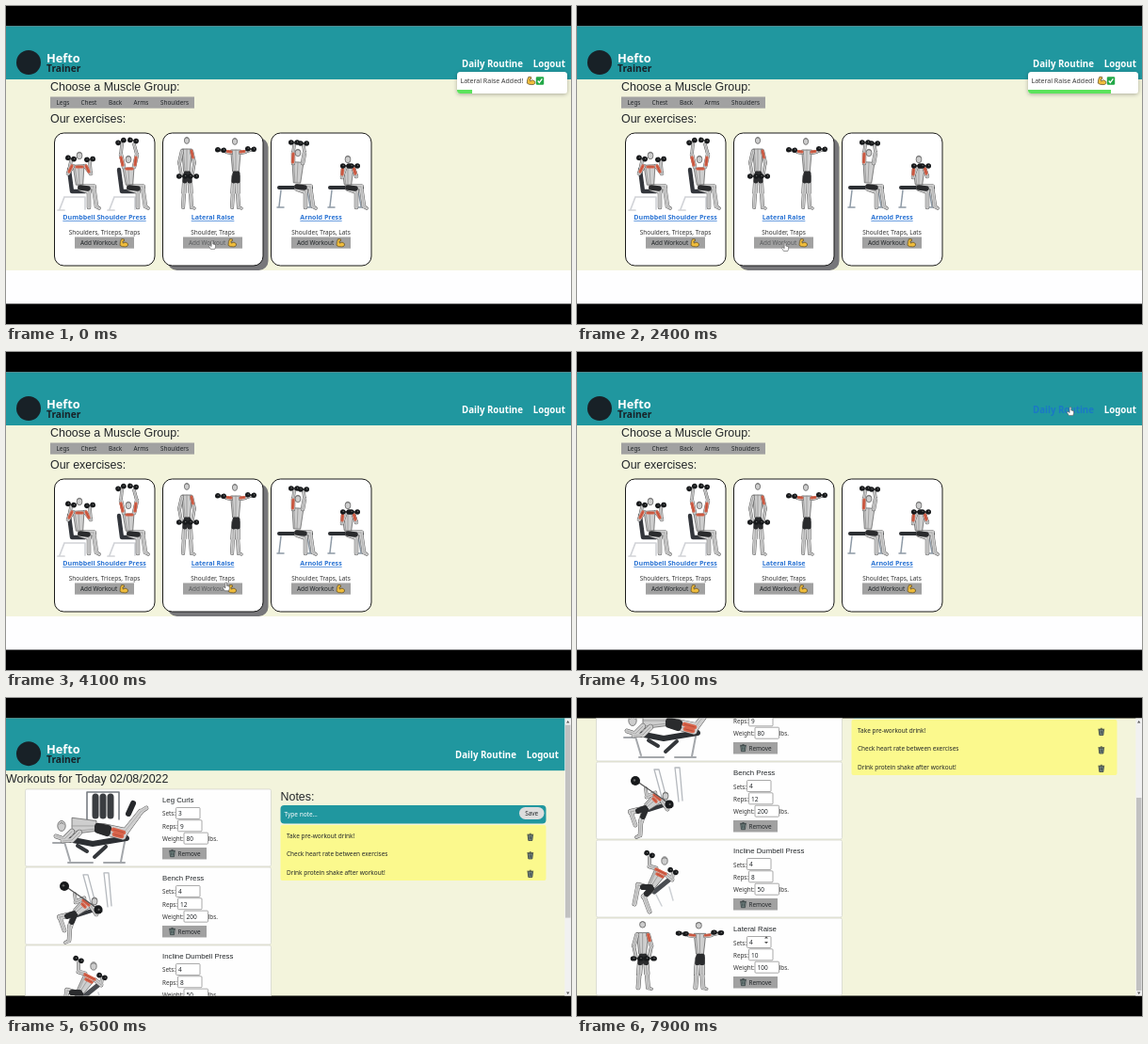
These frames come from a looping animation (600x338 px, 8 s). An HTML page:

```html
<!DOCTYPE html>
<html lang="en">
<head>
<meta charset="utf-8">
<title>Workout planner</title>
<style>
html, body { margin: 0; width: 100%; height: 100%; overflow: hidden; background: #000; }
svg { display: block; width: 600px; height: 338px; font-family: "Noto Sans", "Open Sans", sans-serif; }
.head { font-family: "Liberation Sans", Arial, sans-serif; }
.bold { font-weight: 700; }
.fig path { fill: none; stroke-linecap: round; stroke-linejoin: round; }
</style>
</head>
<body>
<svg id="stage" viewBox="0 0 600 338"></svg>
<script>
const LOOP = 8000, PAGE_SWITCH = 5300, MAX_SCROLL = 112.8;
const TEAL = '#20979f', BEIGE = '#f3f4dc', INK = '#222629', GREY = '#a1a1a1';

const text = (x, y, s, size = 6.5, fill = INK, attrs = '') =>
  `<text x="${x}" y="${y}" font-size="${size}" fill="${fill}" ${attrs}>${s}</text>`;
const heading = (x, y, s, size = 12.45) => text(x, y, s, size, INK, 'class="head"');
const middle = 'text-anchor="middle"';
const rect = (x, y, w, h, fill, attrs = '') =>
  `<rect x="${x}" y="${y}" width="${w}" height="${h}" fill="${fill}" ${attrs}/>`;
const line = (d, w, color) => `<path d="${d}" stroke="${color}" stroke-width="${w}"/>`;
const group = (content, x, y, attrs = '') => `<g transform="translate(${x} ${y})" ${attrs}>${content}</g>`;

// Icons, centred on x, y
const flex = (x, y) => group(`<path d="M-2.6-4.2L.2-4 .3-2-1.3-1.8-.9.3Q2-2 4.2.8 4.9 3.9 1.5 4.1-2.5 4.3-4.2 2.6-4.3-1.5-2.6-4.2Z"
  fill="#f0bd3c" stroke="#5b4a25" stroke-width=".7"/>`, x, y);
const check = (x, y) => group(rect(-4.2, -4.2, 8.4, 8.4, '#22a846', 'rx="1.2"') +
  '<path d="M-2.3 0L-.7 2 2.4-2.2" fill="none" stroke="#fff" stroke-width="1.3"/>', x, y);
const trash = (x, y) => group(`<path d="M-2.7-2.2H2.7L2 3.5H-2Z" fill="#7d8f8c" stroke="#333e3f" stroke-width=".8"/>
  <path d="M-3.4-2.8H3.4M-1-3.7H1M-.8-1V2.3M.8-1V2.3" stroke="#333e3f" stroke-width=".8"/>`, x, y);

// Exercise drawings
const dumbbell = (x, y, angle = 0, r = 2.8) => `<g transform="translate(${x} ${y}) rotate(${angle})">
  <path d="M-5 0H5" stroke="#333" stroke-width="1.4"/>
  <circle cx="-3.2" r="${r}" fill="#17191b"/><circle cx="3.2" r="${r}" fill="#17191b"/>
  <circle cx="-2.8" cy="-.5" r=".7" fill="#666"/><circle cx="3.6" cy="-.5" r=".7" fill="#666"/></g>`;

// Each joint makes the limb thinner
function limb([x, y, ...joints], width, extra, color) {
  let out = '';
  for (let i = 0; i < joints.length; i += 2) {
    const [nx, ny] = joints.slice(i, i + 2);
    out += line(`M${x} ${y}L${nx} ${ny}`, width + extra, color);
    [x, y, width] = [nx, ny, width * .74];
  }
  return out;
}

function trunk([x0, y0, x1, y1], half) {
  const length = Math.hypot(x1 - x0, y1 - y0);
  const nx = (y0 - y1) / length * half, ny = (x1 - x0) / length * half;
  const points = [[x0 + nx, y0 + ny], [x0 - nx, y0 - ny], [x1 - nx * .62, y1 - ny * .62], [x1 + nx * .62, y1 + ny * .62]];
  return `<polygon points="${points.join(' ')}" fill="#cecece" stroke="#555" stroke-width=".7" stroke-linejoin="round"/>` +
    line(`M${x0} ${y0}L${x1} ${y1}M${x0 + nx * .7} ${y0 + ny * .7}L${x1 + nx * .35} ${y1 + ny * .35}`, .7, '#8e8e8e');
}

function man({ head: [x, y], torso, arms, legs, shorts, red, size = 1 }) {
  const limbs = (all, w) => all.map(l => limb(l, w, .9, '#555')).join('') +
    all.map(l => limb(l, w, 0, '#d0d0d0') + limb(l, .7, 0, '#949494')).join('');
  return limbs(legs, 4.8 * size) + trunk(torso, 6 * size) + limbs(arms, 3.5 * size) +
    line(shorts, 5.6 * size, '#2a2b2d') + line(red, 3.2 * size, '#d9654c') + line(red, .6, '#a63d2b') +
    `<ellipse cx="${x}" cy="${y}" rx="${2.9 * size}" ry="${3.8 * size}" fill="#cdcdcd" stroke="#555" stroke-width=".7"/>` +
    line(`M${x - 2.2} ${y - 2}q2.2-2.8 4.4 0`, 1, '#777');
}

const chair = x => line(`M${x} 203L${x - 5} 216M${x + 22} 203V216M${x - 7} 217H${x}M${x} 203H${x + 22}`, 1.7, '#d2d4d8') +
  line(`M${x + 5} 174L${x + 8} 197H${x + 22}`, 4.4, '#33363c');
const flatBench = x => line(`M${x + 5} 196L${x + 3} 213M${x + 33} 196L${x + 36} 213M${x + 1} 214H${x + 8}M${x + 32} 214H${x + 38}`, 1.5, '#8d99a5') +
  line(`M${x + 3} 193H${x + 37}`, 4, '#2c2f33');
const seatedLegs = (x, y = 192) => [[x, y + 2, x + 9, y + 5, x + 9, 214], [x, y, x + 14, y, x + 17, 213, x + 20, 215]];

const shoulderPress = chair(62) + man({
    head: [78, 159], torso: [77, 169, 78, 190], legs: seatedLegs(79),
    arms: [[71, 170, 66, 178, 69, 165], [84, 170, 90, 178, 89, 166]],
    shorts: 'M79 193L87 194', red: 'M70 170L67 176M85 170L88 176M75 171H81' }) +
  dumbbell(69, 162, 12) + dumbbell(89, 163, -8) +
  chair(115) + man({
    head: [130, 163], torso: [130, 172, 131, 190], legs: seatedLegs(131),
    arms: [[125, 171, 122, 158, 123, 147], [136, 171, 139, 158, 136, 147]],
    shorts: 'M131 193L140 194', red: 'M124 169L122 161M137 169L138 161M128 173H134' }) +
  dumbbell(122, 144, -25) + dumbbell(135, 143, 10);

const lateralRaise = man({
    head: [192, 143], torso: [192, 152, 192, 176], legs: [[190, 181, 189, 198, 188, 214], [195, 181, 196, 198, 197, 214, 200, 215]],
    arms: [[187, 154, 184, 167, 186, 179], [197, 154, 200, 167, 198, 179]],
    shorts: 'M191 178L190 186M194 178L195 186', red: 'M197 154L198.5 161', size: .9 }) +
  dumbbell(187, 181) + dumbbell(199, 181) + man({
    head: [243, 144], torso: [244, 153, 244, 176], legs: [[242, 181, 241, 198, 240, 214], [246, 181, 246, 198, 247, 214, 250, 215]],
    arms: [[239, 156, 234, 155, 227, 153], [249, 156, 254, 155, 261, 153]],
    shorts: 'M243 178L242 186M246 178L246 186', red: 'M239 155L235 154.5M249 155L253 154.5', size: .9 }) +
  dumbbell(228, 153, 5) + dumbbell(260, 152, 5);

const arnoldPress = flatBench(287) + man({
    head: [310, 156], torso: [310, 166, 309, 188], legs: seatedLegs(309),
    arms: [[305, 167, 305, 156, 306, 148], [315, 167, 317, 156, 316, 148]],
    shorts: 'M309 192L317 193', red: 'M304.5 166L305 157' }) +
  dumbbell(306, 145) + dumbbell(316, 146) + flatBench(341) + man({
    head: [363, 163], torso: [363, 172, 363, 190], legs: seatedLegs(363),
    arms: [[358, 173, 357, 182, 361, 171], [369, 173, 372, 181, 369, 171]],
    shorts: 'M363 193L371 194', red: 'M357.5 173L357 179M369.5 173L371 178' }) +
  dumbbell(361, 170) + dumbbell(370, 170);

const legCurl = line('M86 3V32M120 3V32M86 3H120', 1.6, '#777c82') +
  line('M95 8V28M103 8V28M111 8V28', 7, '#3a3d41') +
  line('M62 56L68 76M126 56L122 77M66 78H92M104 78H126M50 57H62', 2, '#a4a7ab') + line('M66 53L92 58L128 52', 6, '#2c2f33') +
  line('M106 61L94 72M76 60L86 66', 4, '#34373b') + man({
    head: [59, 39], torso: [70, 39, 96, 39], size: 1.45,
    arms: [[70, 45, 62, 53, 53, 50], [78, 46, 70, 54, 60, 55]],
    legs: [[102, 44, 124, 50, 140, 28], [102, 40, 126, 45, 143, 24, 149, 20]],
    shorts: 'M98 40L108 42M98 43L107 46', red: 'M114 43L125 46M115 48L123 50' }) +
  line('M130 26L135 15', 6, '#26282b');

const benchPress = line('M82 8L91 41M87 8L96 42M104 6L108 42M109 6L112 41M82 8H87M104 6H109', 1.3, '#b4b8bd') +
  line('M76 51L98 44', 4, '#34373b') + man({
    head: [94, 36], torso: [87, 37, 74, 48], size: 1.05,
    arms: [[83, 33, 74, 37, 73, 28], [90, 41, 96, 50, 94, 43]],
    legs: [[72, 50, 68, 63, 67, 78, 63, 80], [70, 50, 57, 53, 62, 67]],
    shorts: 'M72 49L65 52M73 51L70 58', red: 'M82 35L88 40M81 39L84 42' }) +
  line('M60 18L102 47', 1.3, '#555') + '<circle cx="62" cy="20" r="5" fill="#17191b"/><circle cx="98" cy="45" r="4.6" fill="#17191b"/>' +
  '<circle cx="61" cy="19.4" r="1.2" fill="#666"/><circle cx="98.6" cy="45" r="1.1" fill="#666"/>';

const inclinePress = line('M84 58L90 70M98 50L102 64', 1.5, '#ced1d5') + line('M82 55L98 42', 5, '#4a4d52') + man({
    head: [93, 22], torso: [89, 33, 79, 49], size: 1.1,
    arms: [[84, 30, 77, 28, 77, 18], [95, 37, 101, 42, 102, 34]],
    legs: [[79, 53, 71, 60, 77, 76], [76, 51, 65, 48, 61, 68]],
    shorts: 'M78 50L70 50M79 52L74 57', red: 'M84 31L94 36M85 36L91 39' }) +
  dumbbell(77, 15, 25) + dumbbell(102, 33, 25);

// Shared page parts
const header = navX => rect(0, 21, 600, 57, TEAL) +
  '<circle cx="24" cy="60" r="13" fill="#182127"/>' +
  text(43, 59.8, 'Hefto', 12.8, '#fff', 'class="bold"') + text(43, 70.3, 'Trainer', 10.2, '#182127', 'class="bold"') +
  text(navX, 65, 'Daily Routine', 9.7, '#fff', `class="bold" id="nav${navX}"`) +
  text(navX + 75.7, 65, 'Logout', 9.7, '#fff', 'class="bold"');

function exerciseCard(x, name, muscles, drawing, id) {
  const mid = x + 53.5;
  return rect(x + 5.5, 140, 107, 141, '#77777a', `rx="10" id="shadow${id}"`) +
    rect(x + .5, 135, 106.5, 141, '#fff', 'rx="10" stroke="#1a1a1a"') +
    `<g class="fig">${drawing}</g>` +
    text(mid, 227, name, 7.08, '#2b74d4', `class="bold" text-decoration="underline" ${middle}`) +
    text(mid, 243, muscles, 6.5, '#333', middle) +
    rect(mid - 31.5, 245.5, 63, 12.2, GREY) +
    text(mid - 25.5, 254.2, 'Add Workout', 6.35, INK, `id="add${id}"`) + flex(mid + 20.7, 251.8);
}

const groups = [['Legs', 53.5], ['Chest', 79.5], ['Back', 109], ['Arms', 135.5], ['Shoulders', 164]];
const exercisesPage = rect(0, 21, 600, 296, '#fefeff') + rect(0, 78, 600, 203, BEIGE) + header(484) +
  heading(47, 90.4, 'Choose a Muscle Group:') + rect(47, 96.5, 153, 12.2, GREY) +
  groups.map(([name, x]) => text(x, 104.8, name, 6.36)).join('') +
  heading(47, 124, 'Our exercises:') +
  exerciseCard(51, 'Dumbbell Shoulder Press', 'Shoulders, Triceps, Traps', shoulderPress, 0) +
  exerciseCard(166, 'Lateral Raise', 'Shoulder, Traps', lateralRaise, 1) +
  exerciseCard(281, 'Arnold Press', 'Shoulder, Traps, Lats', arnoldPress, 2);

const toast = `<g id="toast" filter="url(#soft)"><g clip-path="url(#toastClip)">` +
  rect(479, 70, 117, 23, '#fff') + text(482.5, 82, 'Lateral Raise Added!', 7, '#3a3a3a') +
  flex(557.5, 79.5) + check(567, 79.5) + rect(479, 89, 16, 4, '#5ce35c', 'id="bar"') + '</g></g>';

function field(label, value, y, x, w) {
  return text(166, y + 9, label, 6.3, '#333') +
    rect(x, y, w, 12, '#fff', 'rx="1" stroke="#858585" stroke-width=".7"') + text(x + 2.5, y + 8.8, value);
}

const workouts = [
  ['Leg Curls', 3, 9, 80, legCurl],
  ['Bench Press', 4, 12, 200, benchPress],
  ['Incline Dumbell Press', 4, 8, 50, inclinePress],
  ['Lateral Raise', 4, 10, 100, `<g transform="translate(-155 -129) scale(1.17 .95)">${lateralRaise}</g>`]
];
const workoutCard = ([name, sets, reps, weight, drawing], i) => group(
  rect(20.5, 0, 261, 82, '#fefefe', 'rx="1.5" stroke="#d5d6cc" stroke-width=".8"') +
  `<g class="fig">${drawing}</g>` + heading(166, 14, name, 7.8) +
  field('Sets:', sets, 19.5, 180.5, 25.5) + field('Reps:', reps, 32.8, 182.5, 25.5) +
  field('Weight:', weight, 46.2, 189, 25.5) + text(214.7, 55.2, 'lbs.', 6.3, '#333') +
  rect(166, 62, 47, 12.5, GREY) + trash(176.5, 68.2) + text(182.5, 70.7, 'Remove', 6.4), 0, 97 + 83 * i);

const notes = ['Take pre-workout drink!', 'Check heart rate between exercises', 'Drink protein shake after workout!'];
const routineBody = heading(0, 90, 'Workouts for Today 02/08/2022') + workouts.map(workoutCard).join('') +
  heading(291.5, 109, 'Notes:') + rect(291.5, 114, 282, 19.5, TEAL, 'rx="4"') +
  text(295.5, 126, 'Type note...', 6.5, '#fff') + rect(545, 116, 26.5, 13, '#dcdddd', 'rx="6.5"') +
  text(558.2, 124.7, 'Save', 6.4, INK, middle) + rect(291.5, 135, 282, 59, '#fbf98d', 'rx="2"') +
  notes.map((note, i) => text(298, 148.6 + 19.5 * i, note, 6.47) + trash(556.8, 148 + 19.5 * i)).join('') +
  '<path id="spinner" d="M199 367.6L201 365.3L203 367.6ZM199 371L201 373.3L203 371Z" fill="#555"/>';
const routinePage = rect(0, 21, 600, 409, BEIGE) + header(477) + group(routineBody, 0, .8);

const scrollbar = rect(593.3, 21, 6.7, 296, '#f1f1f1') + rect(594, 28, 5.4, 205, '#c1c1c1', 'id="thumb"') +
  '<path d="M595 26.4L596.7 24L598.4 26.4ZM595 312.6L596.7 315L598.4 312.6Z" fill="#555"/>';

const cursors = `<path id="hand" d="M-.9-4.2Q0-5 .8-4.2V-1L3.5-.3Q4 2 2.8 4.4H-1.6L-3.6 1.2Q-3.4 0-2.2.6L-.9 1.6Z" fill="#fff" stroke="#555" stroke-width=".6"/>
  <path id="arrow" d="M-1.4-2.3V2.6L-.3 1.6.5 3.2 1.3 2.9.6 1.4H2Z" fill="#fff" stroke="#777" stroke-width=".6"/>`;

const stage = document.getElementById('stage');
stage.innerHTML = `<defs>
  <clipPath id="view"><rect y="21.5" width="600" height="295"/></clipPath>
  <clipPath id="toastClip"><rect x="479" y="70" width="117" height="23" rx="3.5"/></clipPath>
  <filter id="soft" x="-10%" y="-30%" width="120%" height="180%"><feDropShadow dx="0" dy="1" stdDeviation="2" flood-opacity=".3"/></filter>
  </defs>${rect(0, 0, 600, 338, '#000')}<g clip-path="url(#view)">
  <g id="exercises">${exercisesPage}${toast}</g>
  <g id="routine"><g id="scroller">${routinePage}</g>${scrollbar}</g>${cursors}</g>`;

const $ = id => document.getElementById(id);
const show = (id, on) => $(id).setAttribute('visibility', on ? 'inherit' : 'hidden');
const move = (id, x, y) => $(id).setAttribute('transform', `translate(${x} ${y})`);
const progress = (t, from, to) => Math.min(1, Math.max(0, (t - from) / (to - from)));
const smooth = p => p * p * (3 - 2 * p);
const mix = (a, b, p) => a + (b - a) * p;
show('shadow0', false);
show('shadow2', false);

const cursorPath = [[0, 219, 254], [1200, 220, 255], [3500, 222, 257], [4000, 222, 257], [4850, 524, 63],
  [5400, 524, 63], [6200, 338, 198], [7000, 338, 198], [7600, 190, 258], [8000, 190, 258]];
function cursorAt(t) {
  const i = cursorPath.findIndex(stop => stop[0] > t);
  const [t0, x0, y0] = cursorPath[i - 1], [t1, x1, y1] = cursorPath[i];
  const p = smooth(progress(t, t0, t1));
  return [mix(x0, x1, p), mix(y0, y1, p)];
}

function toastOffset(t) {
  const p = progress(t, 3550, 4250);
  return p < .2 ? -7 * smooth(p / .2) : mix(-7, 730, smooth((p - .2) / .8));
}

function render(t) {
  const onRoutine = t >= PAGE_SWITCH;
  show('exercises', !onRoutine);
  show('routine', onRoutine);

  const [x, y] = cursorAt(t);
  const overCard = !onRoutine && x < 273 && y > 135;
  const overAdd = overCard && x < 251 && y > 245;
  const overNav = !onRoutine && x > 484 && x < 549 && y < 69;
  const overField = onRoutine && x < 206 && y > 252;
  show('shadow1', overCard);
  $('add1').setAttribute('opacity', overAdd ? .55 : 1);
  $('nav484').setAttribute('fill', overNav ? '#1b78c6' : '#fff');
  show('spinner', overField);

  move('toast', toastOffset(t), 0);
  $('bar').setAttribute('width', Math.min(117, 16 + .03 * t));

  const scrolled = 1 - (1 - progress(t, 6500, 6900)) ** 3;
  move('scroller', 0, -MAX_SCROLL * scrolled);
  move('thumb', 0, 78 * scrolled);

  const pointing = overAdd || overNav;
  const hidden = overField || (t >= 6200 && t < 6600);
  show('hand', pointing);
  show('arrow', !pointing && !hidden);
  move('hand', x, y);
  move('arrow', x, y);
}

function tick(now) {
  render(now % LOOP);
  requestAnimationFrame(tick);
}
render(0);
requestAnimationFrame(tick);
</script>
</body>
</html>
```
